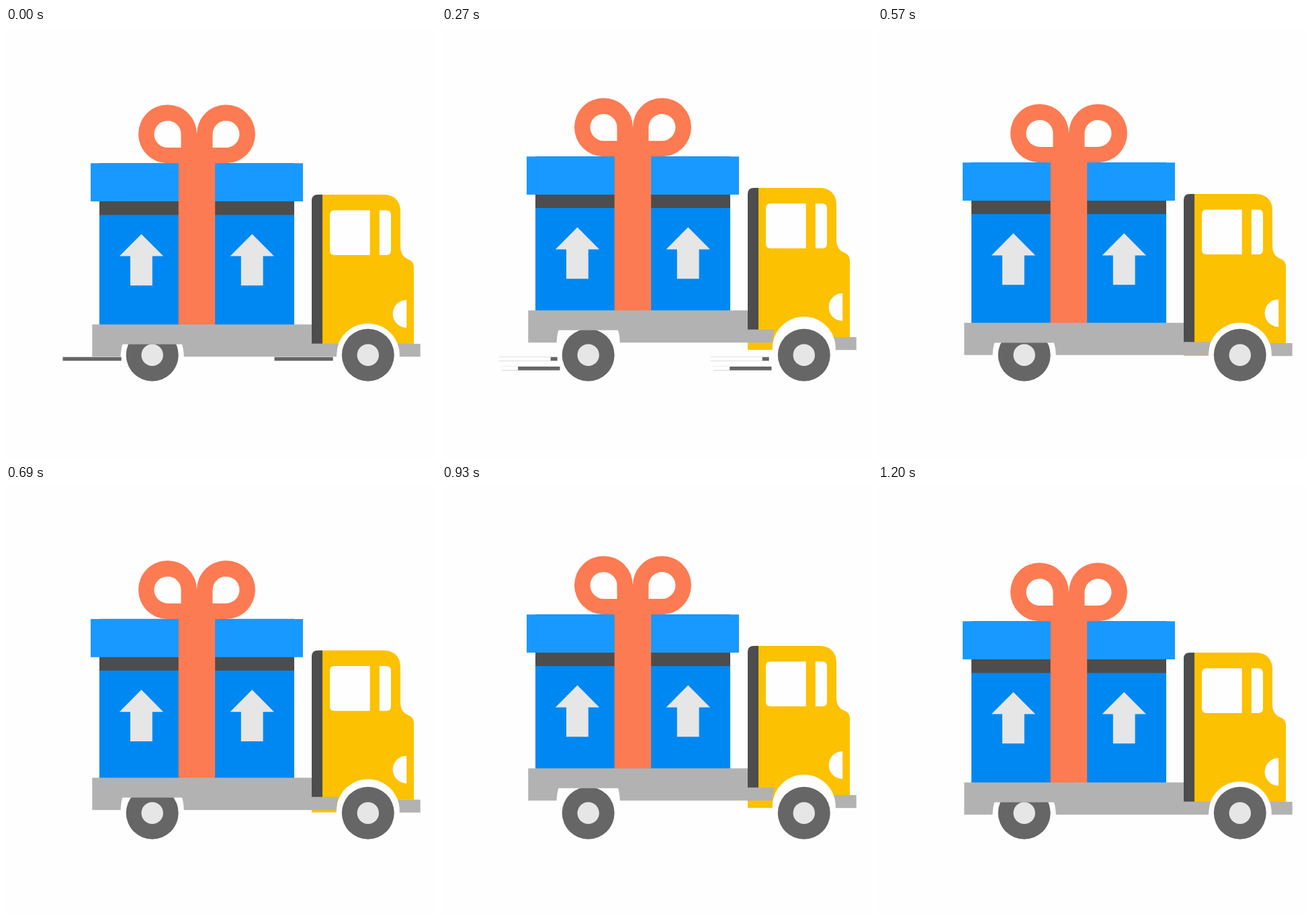
Write an HTML page that moves like this. It is 640x640 px and loops after 1410 ms.

```html
<!DOCTYPE html>
<html lang="en">
<head>
<meta charset="utf-8">
<title>Gift delivery truck</title>
<style>
  html, body { margin: 0; width: 100%; height: 100%; overflow: hidden; background: #fefefe; }
  svg { display: block; width: 100vw; height: 100vh; }
  .paper { fill: #fefefe; }
  .dark { fill: #4d4d4d; }
  .grey { fill: #b2b2b2; }
  .pale { fill: #e6e6e6; }
  .tyre { fill: #666; }
</style>
</head>
<body>
<svg viewBox="0 0 640 640">
  <defs>
    <path id="loop" fill-rule="evenodd" d="M284 201.3H240.5A43.5 43.5 0 1 1 284 157.8Z
      M260.5 178V157.8A20 20 0 1 0 240.5 178Z"/>
    <path id="arrow" class="pale" d="M201.5 306.7L234.2 339.5H217.8V383.3H185V339.5H168.8Z"/>
    <g id="wheel">
      <circle class="tyre" r="39"/>
      <circle class="pale" r="16.2"/>
    </g>
    <g id="streaks">
      <g class="streak">
        <rect class="tyre" x="84.5" y="489.7" height="5.6"/>
        <rect class="paper" x="83.2" y="489.7" height="5.6"/>
      </g>
      <g class="streak">
        <rect class="tyre" x="88.3" y="503.9" height="5.6"/>
        <rect class="paper" x="87" y="503.9" height="5.6"/>
      </g>
    </g>
  </defs>

  <use href="#streaks"/>
  <use href="#streaks" x="315"/>
  <use href="#wheel" x="217.7" y="486.7"/>

  <g id="load">
    <path fill="#0088f2" d="M139 201H429V446H139Z"/>
    <path class="dark" d="M139 257H429V278.2H139Z"/>
    <path fill="#1899ff" d="M126 201.3H442V258H126Z"/>
    <use href="#arrow"/>
    <use href="#arrow" x="164.8"/>
    <g fill="#fc7b52">
      <path d="M256.7 200H311.2V446H256.7Z"/>
      <use href="#loop"/>
      <use href="#loop" transform="translate(568) scale(-1 1)"/>
    </g>

    <path fill="#fcc100" d="M455 489V300H469V248H562C578 248 587 258 587 273V325
      C587 335 591 341 599 344.5C604 346.5 607 350 607 356V470H586V489Z"/>
    <path class="dark" d="M455 470V257Q455 248 464 248H471V470Z"/>
    <path class="grey" d="M575 470H616.7V489.3H575Z"/>
    <g class="paper">
      <path d="M541.7 271.3V338H489Q482 338 482 331V278.3Q482 271.3 489 271.3Z"/>
      <path d="M555.8 271.3H566Q573 271.3 573 278.3V331Q573 338 566 338H555.8Z"/>
      <path d="M596.2 404.8A20.6 20.6 0 0 0 596.2 446Z"/>
      <circle cx="538.8" cy="486.7" r="47"/>
    </g>
  </g>

  <path id="bed" class="grey" d="M128.3 441.2H455V469.7H495Q492.4 478 492 489.2H264.8
    Q264.4 478 262 470.8H173.4Q171 478 170.6 489.2H128.3Z"/>
  <use href="#wheel" x="538.8" y="486.7"/>
</svg>
<script>
  const LOOP = 1410, STEP = 30, LAST = 40, LENGTH = 87.2;
  const load = document.getElementById('load');
  const bed = document.getElementById('bed');
  const streaks = [...document.querySelectorAll('.streak')];
  const clamp = v => Math.max(0, Math.min(1, v));
  const lift = (el, y) => el.setAttribute('transform', `translate(0 ${-y})`);

  // Each streak grows over 6 steps, then is wiped from the left over 10.
  function drawStreak(el, n) {
    const [ink, wipe] = el.children;
    ink.setAttribute('width', LENGTH * clamp((n + 6) / 6));
    wipe.setAttribute('width', LENGTH * clamp(n / 10));
    el.setAttribute('visibility', n > -6 && n < 10 ? 'visible' : 'hidden');
  }

  function render(ms) {
    const n = Math.min(LAST, Math.floor(ms % LOOP / STEP));
    const bounce = 1 - Math.abs(n % 20 - 10) / 10;
    lift(load, 11.2 * bounce);
    lift(bed, 23.3 * bounce);
    streaks.forEach((el, i) => drawStreak(el, n - 6 * i));
  }

  const start = performance.now();
  function tick() {
    render(performance.now() - start);
    requestAnimationFrame(tick);
  }
  tick();
</script>
</body>
</html>
```
